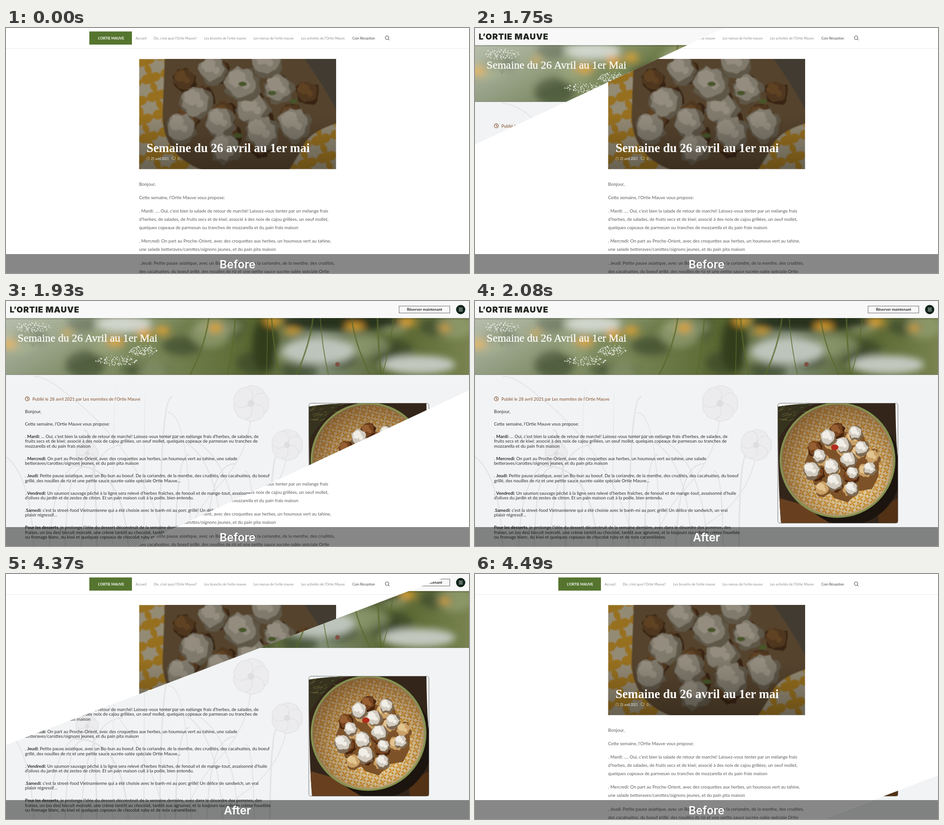
Write an HTML page that moves like this. It is 1000x531 px and loops after 4520 ms.

```html
<!DOCTYPE html>
<html lang="fr">
<head>
<meta charset="utf-8">
<title>Before / After</title>
<style>
html, body { margin: 0; width: 100%; height: 100%; overflow: hidden; background: #fff }
svg { display: block; width: 100%; height: 100%; font-family: Lato, "Open Sans", sans-serif }
.serif { font-family: "Liberation Serif", "Noto Serif", serif }
.inter { font-family: Inter, Roboto, sans-serif }
.bold { font-weight: 700 }
.line { fill: none; stroke-linecap: round }
</style>
</head>
<body>
<svg viewBox="0 0 1000 531">
  <defs>
    <clipPath id="wipe"><polygon id="cut" points="0,0"/></clipPath>
    <clipPath id="dishClip"><rect x="287.5" y="67" width="425.5" height="239"/></clipPath>
    <clipPath id="heroClip"><rect y="37" width="1000" height="123"/></clipPath>
    <clipPath id="bowlClip"><path d="M654 229Q700 221 760 222H908Q909 300 913 340V481H661Q654 400 654 229Z"/></clipPath>
    <filter id="soft" x="-10%" y="-10%" width="120%" height="120%"><feGaussianBlur stdDeviation="8"/></filter>
    <filter id="hazy"><feGaussianBlur stdDeviation=".9"/></filter>
    <pattern id="starsDim" width="44" height="40" patternUnits="userSpaceOnUse" patternTransform="rotate(-18)">
      <rect width="44" height="40" fill="#a87d20"/>
      <path d="M22 3Q28 13 40 10Q33 20 41 30Q28 26 22 38Q17 27 4 31Q11 20 3 10Q16 13 22 3Z" fill="#a59b82"/>
    </pattern>
    <pattern id="starsLit" width="14" height="14" patternUnits="userSpaceOnUse" patternTransform="rotate(12)">
      <rect width="14" height="14" fill="#dcc9a0"/>
      <path d="M7 7Q1 6 1 1Q7 1 7 7Q8 1 13 1Q13 6 7 7Q13 8 13 13Q7 13 7 7Q6 13 1 13Q1 8 7 7Z" fill="#cf8f2c"/>
    </pattern>
    <linearGradient id="shade" x2="0" y2="1">
      <stop offset=".5" stop-opacity="0"/><stop offset="1" stop-opacity=".3"/>
    </linearGradient>
    <linearGradient id="field">
      <stop stop-color="#8b967a"/><stop offset=".3" stop-color="#7c8a5c"/><stop offset=".55" stop-color="#57652f"/>
      <stop offset=".68" stop-color="#84917a"/><stop offset=".83" stop-color="#56632f"/><stop offset="1" stop-color="#78834f"/>
    </linearGradient>
    <linearGradient id="veil" y2=".35">
      <stop stop-color="#e4e6e0" stop-opacity=".5"/><stop offset=".4" stop-color="#e4e6e0" stop-opacity="0"/>
    </linearGradient>
    <radialGradient id="bowlShade" cx=".6" cy=".65" r=".7">
      <stop offset=".3" stop-color="#4a2609" stop-opacity="0"/><stop offset="1" stop-color="#4a2609" stop-opacity=".6"/>
    </radialGradient>
  </defs>
  <g id="before"></g>
  <g id="after" clip-path="url(#wipe)"></g>
</svg>
<script>
const $ = id => document.getElementById(id);
let seed = 11;
const rnd = () => (seed = seed * 16807 % 2147483647) / 2147483647;
const between = (a, b) => a + (b - a) * rnd();
const repeat = (n, draw) => Array.from({length: n}, (_, i) => draw(i)).join('');

// Spreads n items evenly over an ellipse
const spiral = (n, x, y, rx, ry, draw) => repeat(n, i => {
  const a = i * 2.4, k = Math.sqrt((i + .5) / n);
  return draw(x + rx * k * Math.cos(a), y + ry * k * Math.sin(a), i);
});

const text = (x, y, size, fill, str, more = '') =>
  `<text x="${x}" y="${y}" font-size="${size}" fill="${fill}" ${more}>` +
  str.replace(/\*(.+?)\*/g, '<tspan class="bold">$1</tspan>') + '</text>';
const rect = (x, y, w, h, fill, more = '') =>
  `<rect x="${x}" y="${y}" width="${w}" height="${h}" fill="${fill}" ${more}/>`;
const oval = (x, y, rx, ry, fill, more = '') =>
  `<ellipse cx="${x}" cy="${y}" rx="${rx}" ry="${ry}" fill="${fill}" ${more}/>`;
const line = (d, stroke, width = 1, more = '') =>
  `<path class="line" d="${d}" stroke="${stroke}" stroke-width="${width}" ${more}/>`;

// A blank line in str starts a new paragraph
const article = (x, y, size, fill, leading, gap, str) => str.trim().split('\n').map(row => {
  if (!row) { y += gap; return ''; }
  y += leading;
  return text(x, y - leading, size, fill, row);
}).join('');

function blob(x, y, r, fill) {
  const points = repeat(18, i => {
    const a = i * Math.PI / 9, k = r * between(.8, 1.12);
    return `${x + k * Math.cos(a)},${y + k * Math.sin(a)} `;
  });
  return `<polygon points="${points}" fill="${fill}"/>`;
}
const lump = (x, y, r, [dark, mid, light]) =>
  blob(x + r * .12, y + r * .15, r, dark) + blob(x, y, r * .88, mid) +
  blob(x - r * .2, y - r * .22, r * .5, light) + blob(x + r * .3, y + r * .15, r * .25, light);

const banner = label => rect(0, 490, 1000, 41, '#000', 'opacity=".47"') +
  text(500, 520.5, 24.3, '#fff', label, 'class="inter" font-weight="600" text-anchor="middle"');

const clock = (x, y, r, color, w) => oval(x, y, r, r, 'none', `stroke="${color}" stroke-width="${w}"`) +
  line(`M${x} ${y - r * .55}V${y}L${x + r * .4} ${y + r * .35}`, color, w);

function dish() {
  const crust = ['#3d2815', '#593c20', '#6b4a28'], cheese = ['#69614f', '#8f8879', '#a59d8d'];
  return `<g clip-path="url(#dishClip)"><g filter="url(#hazy)">` +
    rect(287, 67, 426, 239, 'url(#starsDim)') +
    `<path d="M343 60H720V205Q650 225 640 262L610 310H430Q340 280 338 190Z" fill="#5f4b31"/>` +
    `<path d="M640 60H720V190Q690 130 640 60Z" fill="#494338"/>` +
    spiral(14, 505, 160, 150, 105, (x, y) => lump(x, y, 27, crust)) +
    spiral(11, 500, 172, 145, 115, (x, y) => lump(x, y, between(31, 41), cheese)) +
    repeat(4, () => oval(between(470, 670), between(120, 260), 9, 5, '#4f5e2e')) +
    '</g>' + rect(287, 67, 426, 239, '#000', 'opacity=".1"') + rect(287, 67, 426, 239, 'url(#shade)') + '</g>';
}

function drawBefore() {
  const nav = ['Accueil', 'Dis, c’est quoi l’Ortie Mauve?', 'Les brunchs de l’ortie mauve',
    'Les menus de l’ortie mauve', 'Les activités de l’Ortie Mauve'];
  return rect(0, 0, 1000, 531, '#fff') + rect(0, 44, 1000, 1, '#e9e9e9') +
    rect(180, 7.5, 92, 28.5, '#55752f') +
    text(227, 24.5, 7.6, '#fff', 'L’ORTIE MAUVE', 'class="bold" text-anchor="middle"') +
    text(264, 24.5, 7.3, '#8c8c8c', nav.map(s => `<tspan dx="16">${s}</tspan>`).join('')) +
    text(748, 24.5, 7.3, '#444', 'Coin Réception') +
    oval(823, 21, 3.9, 3.9, 'none', 'stroke="#444"') + line('M826 24L828.3 26.3', '#444') +
    dish() +
    text(303.5, 269, 26.6, '#fff', 'Semaine du 26 avril au 1er mai', 'class="serif bold"') +
    clock(307, 283, 3.3, '#d5d0c4', .6) + text(313, 285.7, 6.6, '#eee', '25 avril 2021') +
    line('M359 279.5H365.5V284.5H363L361.5 286V284.5H359Z', '#d8cf9a', .7) + text(371, 285.7, 6.6, '#eee', '0') +
    article(287.5, 341.5, 9.7, '#5c5c5c', 18, 11.3, `
Bonjour,

Cette semaine, l’Ortie Mauve vous propose:

. Mardi: …. Oui, c’est bien la salade de retour de marché! Laissez-vous tenter par un mélange frais
d’herbes, de salades, de fruits secs et de kiwi; associé à des noix de cajou grillées, un oeuf mollet,
quelques copeaux de parmesan ou tranches de mozzarella et du pain frais maison

. Mercredi: On part au Proche-Orient, avec des croquettes aux herbes, un houmous vert au tahine,
une salade betteraves/carottes/oignons jeunes, et du pain pita maison

. Jeudi: Petite pause asiatique, avec un Bo-bun au boeuf. De la coriandre, de la menthe, des crudités,
des cacahuètes, du boeuf grillé, des nouilles de riz et une petite sauce sucrée-salée spéciale Ortie`) +
    banner('Before');
}

function meadow() {
  const patches = (n, color, r, top, bottom, alpha) => repeat(n, i =>
    oval((i + rnd()) * 1000 / n, between(top, bottom), r * between(.7, 1.4), r * between(.4, .8), color, `opacity="${alpha}"`));
  const umbel = (x, y, w, h) => repeat(9, i => line(`M${x} ${y + 42}L${x + w * (i / 4 - 1)} ${y}`, '#71805a', .8)) +
    spiral(90, x, y, w, h, (px, py) => oval(px + between(-3, 3), py + between(-2, 2), between(.6, 1.8), between(.6, 1.4), '#e9ebe4'));
  return '<g clip-path="url(#heroClip)">' + rect(0, 37, 1000, 123, 'url(#field)') + '<g filter="url(#soft)">' +
    patches(12, '#334024', 38, 40, 150, .6) +
    patches(9, '#9ca57c', 40, 50, 155, .6) +
    oval(725, 45, 130, 20, '#26311c') + oval(560, 95, 28, 60, '#303c1f') +
    oval(675, 108, 78, 28, '#bdc4bb') + oval(890, 138, 80, 20, '#c3c8bf') + oval(255, 50, 60, 18, '#cdd2c8') +
    patches(12, '#e0a02c', 15, 42, 95, .9) + '</g>' +
    repeat(9, i => {
      const x = between(430, 600) + i % 3 * 130, lean = between(-50, 50);
      return line(`M${x} 37q${lean * .2} 60 ${lean} 123`, '#5a6a2c', between(1.5, 3.5), 'opacity=".75"');
    }) +
    umbel(295, 108, 30, 11) + umbel(240, 130, 45, 10) + umbel(58, 57, 38, 11) +
    rect(0, 37, 1000, 123, 'url(#veil)') + rect(0, 37, 1000, 3, '#000', 'opacity=".12"') + '</g>' +
    rect(0, 159, 1000, 1.5, '#000', 'opacity=".15"');
}

function sketch() {
  const flower = (x, y, r) => repeat(5, i =>
    `<path d="M0 0C${-r} ${-r * .3} ${-r * .6} ${-r * 1.1} 0 ${-r}C${r * .6} ${-r * 1.1} ${r} ${-r * .3} 0 0Z"
      transform="translate(${x} ${y}) rotate(${i * 72 + 20})" fill="#ececee" stroke="#dcdcde"/>`) +
    oval(x, y, r * .2, r * .2, '#dedee0');
  const stems = repeat(16, i => {
    const x = 60 + i * 34, dx = between(-160, 120), dy = between(150, 340);
    return line(`M${x} 531q${dx * .1} ${-dy} ${dx} ${-dy}`, '#e2e2e4', between(1, 3));
  });
  return stems + line('M529 245Q525 330 460 400T390 531M607 335Q590 420 520 470T470 531M345 531Q300 330 130 200Q90 165 60 163', '#e0e0e2', 1.5) +
    flower(529, 222, 38) + flower(607, 312, 33) + flower(175, 330, 24);
}

function bowl() {
  const cheese = ['#7d6a52', '#d2cbc0', '#f1eee7'], crust = ['#48250f', '#76441f', '#955f32'], cream = ['#80552b', '#c9a066', '#e2c491'];
  return '<g clip-path="url(#bowlClip)">' + rect(650, 218, 270, 270, '#33251a') +
    '<path d="M650 425L720 445L775 490H650Z" fill="#684020"/><path d="M868 450L920 425V490H874Z" fill="#523115"/>' +
    '<path d="M650 215H740Q680 250 650 310Z" fill="#35331e"/>' +
    repeat(26, () => line(`M${between(655, 725)} ${between(225, 260)}l${between(4, 12)} ${between(-5, 0)}`, '#6b6738')) +
    oval(805, 364, 116, 122, '#1c140e') +
    oval(783, 345, 125, 125, '#84914f') + oval(783, 345, 121, 121, '#c9b380') + oval(783, 345, 118, 118, 'url(#starsLit)') +
    oval(783, 345, 121, 121, 'url(#bowlShade)') +
    blob(790, 350, 80, '#7d5228') +
    spiral(16, 790, 350, 75, 72, (x, y, i) => lump(x, y, 17, i % 3 ? cream : crust)) +
    spiral(12, 790, 342, 78, 68, (x, y) => lump(x, y, between(14, 20), cheese)) +
    oval(777, 317, 8, 6, '#b32c1c') + '</g>' +
    rect(654, 221.5, 259.5, 260, 'none', 'rx="5" stroke="#555" stroke-width=".8"');
}

function drawAfter() {
  return rect(0, 0, 1000, 531, '#f2f3f4') + sketch() + meadow() + rect(0, 0, 1000, 37, '#f8f8f8') +
    text(8, 24.5, 17.8, '#20251f', 'L’ORTIE MAUVE', 'class="inter" font-weight="900" letter-spacing=".9"') +
    rect(849, 11, 109.5, 15, 'none', 'stroke="#444" stroke-width=".8"') +
    text(904, 21, 8.3, '#222', 'Réserver maintenant', 'class="bold" text-anchor="middle"') +
    oval(982, 18.5, 10, 10, '#10251b') + line('M978.5 15.5h7.5m-7.5 3h7.5m-7.5 3h7.5', '#fff') +
    text(25, 88, 23.7, '#fff', 'Semaine du 26 Avril au 1er Mai', 'class="serif" stroke="#fff" stroke-width=".3"') +
    oval(716, 137.5, 5, 5, '#7f5142') +
    clock(46, 212, 4.4, '#83512f', 1.2) +
    text(57, 216, 9.3, '#83512f', 'Publié le 28 avril 2021 par Les marmites de l’Ortie Mauve') +
    article(41, 243, 9.6, '#303030', 10.4, 16.6, `
Bonjour,

Cette semaine, l’Ortie Mauve vous propose:

. *Mardi:* … Oui, c’est bien la salade de retour de marché! Laissez-vous tenter par un mélange frais d’herbes, de salades, de
fruits secs et de kiwi; associé à des noix de cajou grillées, un oeuf mollet, quelques copeaux de parmesan ou tranches de
mozzarella et du pain frais maison

. *Mercredi:* On part au Proche-Orient, avec des croquettes aux herbes, un houmous vert au tahine, une salade
betteraves/carottes/oignons jeunes, et du pain pita maison

. *Jeudi:* Petite pause asiatique, avec un Bo-bun au boeuf. De la coriandre, de la menthe, des crudités, des cacahuètes, du boeuf
grillé, des nouilles de riz et une petite sauce sucrée-salée spéciale Ortie Mauve…

. *Vendredi:* Un saumon sauvage pêché à la ligne sera relevé d’herbes fraîches, de fenouil et de mange-tout, assaisonné d’huile
d’olives du jardin et de zestes de citron. Et un pain maison cuit à la poêle, bien entendu.

.*Samedi:* c’est la street-food Vietnamienne qui a été choisie avec le banh-mi au porc grillé! Un délice de sandwich, un vrai
plaisir régressif…

*Pour les desserts*, je prolonge l’idée du dessert déconstruit de la semaine dernière, avec dans le désordre des pommes, des
fraises, un (ou des) biscuit morcelé, une crème tantôt au chocolat, tantôt aux agrumes, et la toujours succulente crème fouettée
ou fromage blanc, du kiwi et quelques copeaux de chocolat ruby et de noix caramélisées.`) +
    bowl() + banner('After');
}

$('before').innerHTML = drawBefore();
$('after').innerHTML = drawAfter();

const LOOP = 4520, REVEAL = 1660, RETURN = 4280, STEP = 30;

// The diagonal edge crosses the left side at height c and the top at c / slope.
function edge(t) {
  const steps = from => Math.floor((t - from) / STEP);
  if (t < REVEAL) return '0,0';
  if (t < RETURN) {
    const c = 47 + 68.5 * steps(REVEAL);
    return `0,0 ${c / .47},0 0,${c}`;
  }
  const c = 33.5 + 112.3 * steps(RETURN);
  return `0,${c} ${c / .383},0 3000,0 3000,3000 0,3000`;
}

let shown;
function frame() {
  const points = edge(performance.now() % LOOP);
  if (points !== shown) $('cut').setAttribute('points', shown = points);
  requestAnimationFrame(frame);
}
frame();
</script>
</body>
</html>
```
